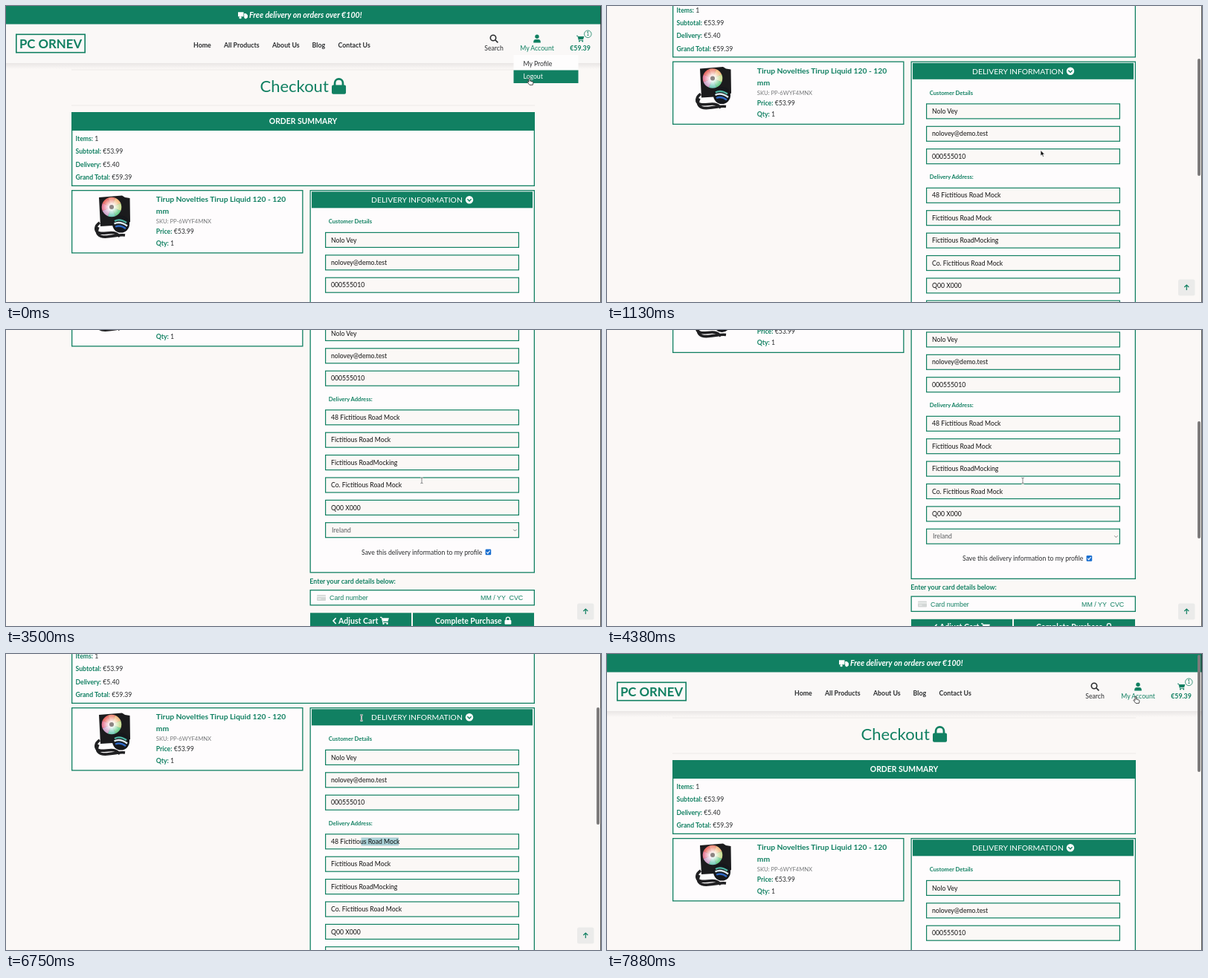
These frames come from a looping animation (800x399 px, 8 s). An HTML page:

```html
<!DOCTYPE html>
<html lang="en">
<head>
<meta charset="utf-8">
<title>Checkout</title>
<style>
html, body { margin: 0; width: 100%; height: 100%; overflow: hidden; background: #fbf8f6; }
svg { display: block; width: 100%; height: 100%; }
text { font-family: Lato, sans-serif; font-size: 8.67px; white-space: pre; }
.b { font-weight: 700; }
.sans { font-family: "Liberation Sans", Arial, sans-serif; font-size: 8.89px; }
</style>
</head>
<body>
<svg id="stage" viewBox="0 0 800 399" xmlns="http://www.w3.org/2000/svg"></svg>
<script>
const LOOP = 8000, STEP = 125;
const GREEN = '#118062', INK = '#2b2d2f', PAPER = '#fbf8f6', PANEL = '#fefcfd';

// Drawing helpers, all returning markup
const text = (x, y, s, fill = INK, extra = '') => `<text x="${x}" y="${y}" fill="${fill}" ${extra}>${s}</text>`;
const bold = (x, y, s, fill = GREEN, size = 8.8, extra = '') =>
  text(x, y, s, fill, `class="b" style="font-size:${size}px" ${extra}`);
const rect = (x, y, w, h, fill, extra = '') =>
  `<rect x="${x}" y="${y}" width="${w}" height="${h}" fill="${fill}" ${extra}/>`;
const frame = (x, y, w, h, fill, line = 1.3) =>
  rect(x + line / 2, y + line / 2, w - line, h - line, fill, `stroke="${GREEN}" stroke-width="${line}"`);
const icon = (x, y, scale, color, body) =>
  `<g transform="translate(${x} ${y}) scale(${scale})" fill="${color}" stroke="${color}" stroke-width="0">${body}</g>`;
const MID = 'text-anchor="middle"';

const LOCK = '<rect y="7" width="14" height="9" rx="1.5"/><path d="M3 8V5a4 4 0 0 1 8 0v3" fill="none" stroke-width="2"/>';
const CART = '<path d="M0 1.2h3L6 12h10" fill="none" stroke-width="1.6"/><path d="M3.6 2.5H18L16 9.5H5.5z"/>' +
  '<circle cx="6.8" cy="14.2" r="1.7"/><circle cx="14.4" cy="14.2" r="1.7"/>';
const TRUCK = '<path d="M0 1h11v9H0zM12 3.5h3.5L19 7v5h-7z"/><circle cx="4.5" cy="12" r="2.4"/><circle cx="15" cy="12" r="2.4"/>';

function header() {
  const nav = [[252, 'Home'], [293, 'All Products'], [358, 'About Us'], [411.5, 'Blog'], [446.5, 'Contact Us']];
  return rect(0, 77, 800, 8, 'url(#shade)') +
    rect(0, 24, 800, 53, '#faf8f7') + rect(0, 0, 800, 24.5, GREEN) +
    icon(312, 7.5, .68, '#fff', TRUCK) +
    bold(327, 16, 'Free delivery on orders over €100!', '#fff', 10.6, 'font-style="italic"') +
    frame(13, 37.5, 94, 26, 'none', 1.6) +
    bold(60, 56.5, 'PC ORNEV', GREEN, 16.8, MID) +
    nav.map(([x, s]) => bold(x, 56, s, INK)).join('') +
    `<g fill="none" stroke="${INK}" stroke-width="1.6"><circle cx="655" cy="43" r="3.7"/><path d="M657.8 45.8l3.6 3.6"/></g>` +
    text(656, 60, 'Search', INK, MID) +
    `<g fill="${GREEN}"><circle cx="714" cy="41.3" r="2.7"/><path d="M709.2 49.5v-1a3.4 3.4 0 0 1 3.4-3.4h2.8a3.4 3.4 0 0 1 3.4 3.4v1z"/></g>` +
    text(714, 60, 'My Account', GREEN, MID) +
    icon(767, 39.5, .57, GREEN, CART) +
    `<circle cx="782.3" cy="37.8" r="4.8" fill="#faf8f7" stroke="${GREEN}" stroke-width=".8"/>` +
    text(782.3, 40.3, '1', GREEN, MID + ' style="font-size:7px"') +
    bold(772, 60, '€59.39', GREEN, 8.8, MID);
}

function menu() {
  return '<g id="menu">' + rect(682.5, 66, 87, 38, '#fefdfd') + rect(682.5, 86.5, 87, 17.5, GREEN) +
    text(695.5, 80.8, 'My Profile') + text(695.5, 98.2, 'Logout', '#fff') + '</g>';
}

function summary() {
  const rows = [['Items:', '1'], ['Subtotal:', '€53.99'], ['Delivery:', '€5.40'], ['Grand Total:', '€59.39']];
  return rect(88, 85.6, 623, .8, '#e8e5e4') + rect(88, 133.6, 623, .8, '#e8e5e4') +
    text(341.5, 116, 'Checkout', GREEN, 'style="font-size:22px"') + icon(438, 97, 1.36, GREEN, LOCK) +
    frame(88, 143, 623, 100, PANEL) + rect(88, 143, 623, 25, GREEN) +
    bold(399.5, 159, 'ORDER SUMMARY', '#fff', 10.4, MID) +
    rows.map((r, i) => pair(93.5, 182 + i * 17.4, r)).join('');
}

function pair(x, y, [label, value]) {
  return `<text x="${x}" y="${y}" fill="${INK}"><tspan class="b" fill="${GREEN}">${label}</tspan> ${value}</text>`;
}

function cooler() {
  const tints = ['#ee8f7c', '#f3bd86', '#c9dd94', '#6fcf8f', '#7bcdbb', '#cfa5cb', '#e87f9a', '#ea6f68'];
  const blades = tints.map((c, i) =>
    `<path d="M0 0L12.2 -5.2A13.2 13.2 0 0 1 12.2 5.2z" fill="${c}" transform="rotate(${i * 45 - 90})"/>`).join('');
  return `<path d="M125 258L156 255.5 160 258 166.5 259 167 291 160 295 127 297z" fill="#1b1b1d"/>
    <path d="M126 292C120 296 118 304 126 306S146 301 153 311M124 298C120 306 124 312 136 311S152 308 160 309" fill="none" stroke="#202022" stroke-width="3.6"/>
    <g transform="translate(142 271)">${blades}<circle r="12" fill="url(#glow)"/><circle r="3" fill="#8d8583"/></g>
    <circle cx="154.5" cy="294" r="11.5" fill="#16181c"/>
    <g fill="none" stroke-width="2.4"><path d="M146 290q7-4 16 2" stroke="#4fb6a4"/><path d="M145.5 293.5q8-4 17.5 3" stroke="#dfeaf0"/><path d="M147 297.5q7-3 14 2.5" stroke="#3169c4"/></g>`;
}

function product() {
  return frame(88, 248, 311.5, 85.5, PANEL) + cooler() +
    bold(201.8, 264.3, 'Tirup Novelties Tirup Liquid 120 - 120', GREEN, 10.3) + bold(201.8, 280, 'mm', GREEN, 10.3) +
    text(201.8, 293, 'SKU: PP-6WYF4MNX', '#77797b', 'style="font-size:7.65px"') +
    pair(201.8, 307.2, ['Price:', '€53.99']) + pair(201.8, 322.6, ['Qty:', '1']);
}

const box = y => frame(429, y - 10.6, 261, 21.2, PAPER, 1.2);
const field = (y, s) => box(y) + text(437, y + 3.1, s, '#111');

function form() {
  const who = ['Nolo Vey', 'nolovey@demo.test', '000555010'];
  const where = ['48 Fictitious Road Mock', 'Fictitious Road Mock', 'Fictitious RoadMocking', 'Co. Fictitious Road Mock', 'Q00 X000'];
  const list = (top, items) => items.map((s, i) => field(top + i * 30.4, s)).join('');
  return frame(408.5, 248, 302.5, 390.5, PANEL) + rect(411, 250.3, 297, 22, GREEN) +
    text(491, 265.2, 'DELIVERY INFORMATION', '#fff', 'style="font-size:10.4px"') +
    `<circle cx="623" cy="261.3" r="5.2" fill="#fff"/><path d="M620.4 260.3l2.6 2.6 2.6-2.6" fill="none" stroke="${GREEN}" stroke-width="1.4"/>` +
    bold(433.8, 293, 'Customer Details', GREEN, 7.6) + list(315.4, who) +
    bold(433.8, 406.7, 'Delivery Address:', GREEN, 7.6) + list(428.8, where) +
    box(580.7) + text(438, 583.8, 'Ireland', '#5a5d60') +
    '<path d="M682.2 579.8l2.2 2.2 2.2-2.2" fill="none" stroke="#777" stroke-width=".9"/>' +
    text(478, 613.8, 'Save this delivery information to my profile') +
    rect(644.6, 606.6, 7.6, 7.6, '#1a6fd0', 'rx="1.2"') +
    '<path d="M646.2 610.4l1.6 1.7 2.8-3.6" fill="none" stroke="#fff" stroke-width="1.2"/>';
}

function payment() {
  return bold(408.3, 652.7, 'Enter your card details below:') +
    frame(408.5, 661, 302.5, 21.5, PANEL) +
    rect(418, 668, 12, 8, '#d3d7d6', 'rx="1"') + rect(418, 669.6, 12, 1.5, '#eef0ef') + rect(419.5, 673, 4, 1, '#f4f5f5') +
    [[435, 'Card number'], [638, 'MM / YY'], [676.5, 'CVC']].map(([x, s]) => text(x, 675, s, GREEN, 'class="sans"')).join('') +
    rect(409, 692.3, 136, 21.5, GREEN) + rect(547, 692.3, 163, 21.5, GREEN) +
    '<path d="M443.6 699.2l-3.6 3.9 3.6 3.9" fill="none" stroke="#fff" stroke-width="1.6"/>' +
    bold(447, 706.8, 'Adjust Cart', '#fff', 10.6) + icon(503, 697.6, .66, '#fff', CART) +
    bold(577, 706.8, 'Complete Purchase', '#fff', 10.4) + icon(670.5, 697.6, .63, '#fff', LOCK);
}

const BEAM = 'M-1.7 -3.8Q0 -3.8 0 -2.8Q0 -3.8 1.7 -3.8M0 -3V3M-1.7 3.8Q0 3.8 0 2.8Q0 3.8 1.7 3.8';
const stage = document.getElementById('stage');
stage.innerHTML = `<defs>
    <linearGradient id="shade" x2="0" y2="1"><stop stop-color="#e9e6e5"/><stop offset="1" stop-color="${PAPER}"/></linearGradient>
    <radialGradient id="glow"><stop offset=".35" stop-color="#fff" stop-opacity=".85"/><stop offset="1" stop-color="#fff" stop-opacity="0"/></radialGradient>
  </defs>` +
  rect(0, 0, 800, 399, PAPER) +
  '<g id="page">' + header() + summary() + product() + form() +
  '<g style="mix-blend-mode:multiply">' + rect(0, 423.5, 0, 10.8, '#add6de', 'id="sel"') + '</g>' +
  payment() + menu() + '</g>' +
  '<g id="up">' + rect(768, 368.5, 22.5, 22, '#ebebea', 'rx="2.5"') +
  `<path d="M779.3 383v-7M776.3 379l3-3 3 3" fill="none" stroke="${GREEN}" stroke-width="1.2"/></g>` +
  rect(794, 1, 4, 158, '#7d7b7b', 'id="thumb" rx="2"') + rect(799.2, 0, .8, 399, '#333') +
  `<g id="cursor">
    <path id="arrow" d="M0 0V7.6L1.8 6 3.1 8.8 4.4 8.2 3.1 5.5H5.5z" fill="#111" stroke="#fff" stroke-width=".7"/>
    <path id="hand" d="M-1 -3.4q1-1 1.7 0V0l3.4 1q1 .4 .8 1.6L4.2 5.4H0L-3 1.6q0-1.2 1.2-.8L-1 1.6z" fill="#fff" stroke="#222" stroke-width=".8"/>
    <g id="beam" fill="none"><path d="${BEAM}" stroke="#fff" stroke-width="2"/><path d="${BEAM}" stroke="#555" stroke-width=".7"/></g>
  </g>`;

const el = Object.fromEntries([...stage.querySelectorAll('[id]')].map(n => [n.id, n]));

// Keys are [time, value, ...], joined by straight lines
const scrollKeys = [[250, 0], [625, 66], [875, 132], [1125, 173.5], [1375, 218], [1750, 282], [2125, 305], [2500, 311],
  [3500, 311], [3875, 42], [4000, 42], [4375, 302.5], [4750, 343], [5750, 343], [6125, 275], [6500, 194], [6750, 176],
  [7000, 110], [7250, 36], [7625, 0]];
const pointerKeys = [[0, 704, 101], [875, 583, 194.5], [2625, 583, 194.5], [3500, 559, 203], [4750, 559, 203],
  [5125, 528, 86], [5500, 478, 86], [7125, 478, 86], [7750, 711, 61]];
const barKeys = [[125, 0], [250, 1], [3000, 1], [3250, 0], [3500, 0], [3625, 1], [5250, 1], [5500, 0], [5750, 0], [5875, 1]];
const selectKeys = [[5125, 0], [5500, 50.5]];

function at(keys, t, i = 1) {
  if (t <= keys[0][0]) return keys[0][i];
  const n = keys.findIndex(k => k[0] >= t);
  if (n < 0) return keys[keys.length - 1][i];
  const a = keys[n - 1], b = keys[n];
  return a[i] + (b[i] - a[i]) * (t - a[0]) / (b[0] - a[0]);
}

const show = (node, on) => node.setAttribute('visibility', on ? 'visible' : 'hidden');

function draw(time) {
  const t = Math.floor(time % LOOP / STEP) * STEP;
  const scroll = at(scrollKeys, t), picked = at(selectKeys, t);
  el.page.setAttribute('transform', `translate(0 ${-scroll})`);
  el.thumb.setAttribute('y', 1 + scroll * .4035);
  el.thumb.setAttribute('opacity', at(barKeys, t));
  el.sel.setAttribute('x', 528 - picked);
  el.sel.setAttribute('width', picked);
  show(el.menu, t < 250);
  show(el.up, scroll > 20);
  el.cursor.setAttribute('transform', `translate(${at(pointerKeys, t)} ${at(pointerKeys, t, 2)})`);
  const shape = t < 250 || t > 7600 ? 'hand' : t < 2750 || t > 7125 ? 'arrow' : 'beam';
  for (const id of ['arrow', 'hand', 'beam']) show(el[id], id === shape);
}

const start = performance.now();
function tick() {
  draw(performance.now() - start);
  requestAnimationFrame(tick);
}
tick();
</script>
</body>
</html>
```
